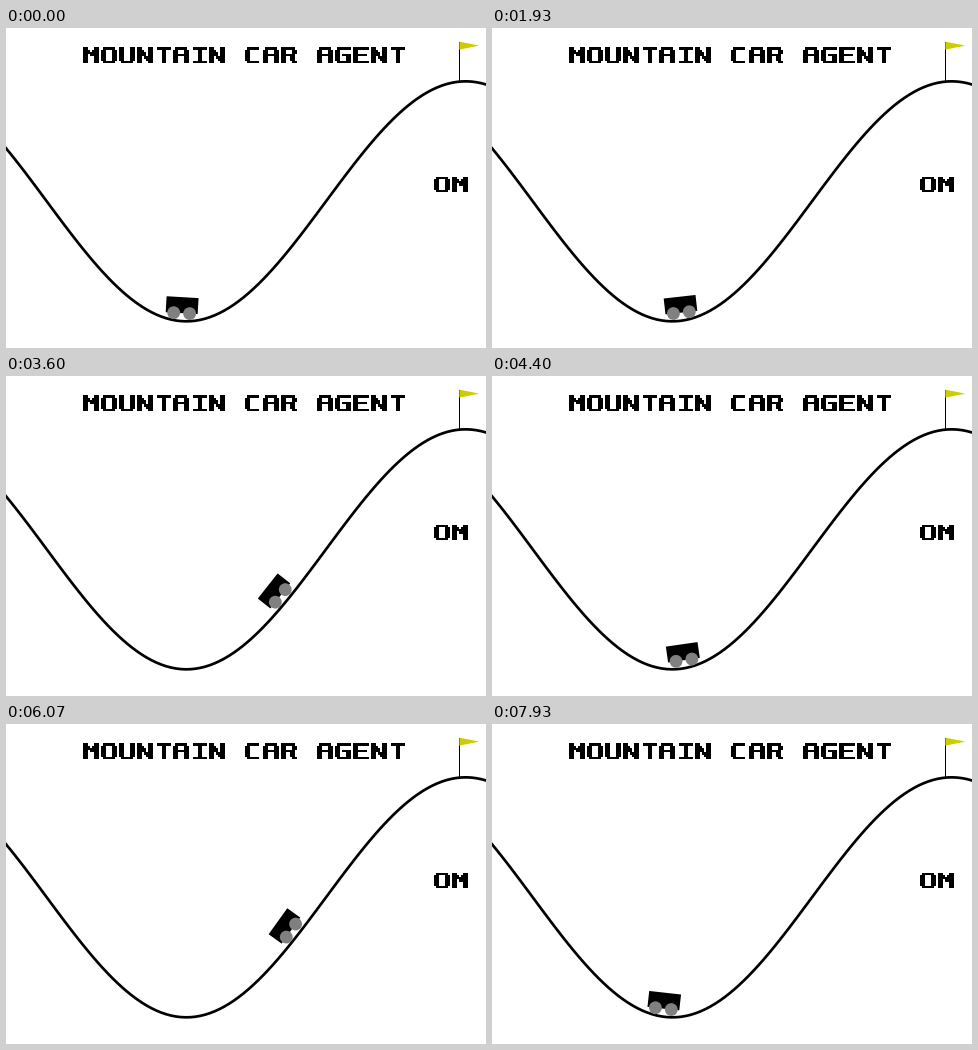
Recreate the animation shown at these times as a matplotlib script. Size 480x320 px, loop 8000 ms.

```python
import numpy as np
import matplotlib.pyplot as plt
from matplotlib.animation import FuncAnimation
from matplotlib.collections import PolyCollection
from matplotlib.patches import Circle, Polygon, Rectangle
from matplotlib.transforms import Affine2D

W, H, DPI = 480, 320, 100
LOOP, POSES, TICKS = 8000, 120, 3   # ms, car poses per loop, ticks per pose
SCALE = W / 1.8                     # the track spans -1.2 .. 0.6
PT = 72 / DPI                       # points per pixel
CELL = 2.25                         # one cell of the 7x7 block letters

# Pen paths over a 3x3 keypad (abc / def / ghi); capitals round that corner.
GLYPHS = {
    "A": "gACi df", "C": "CAGI", "E": "cagi dF", "G": "cAGife",
    "I": "Ac bh Gi", "M": "gaeci", "N": "gaic", "O": "dACIGd",
    "R": "gaCFd ei", "T": "Ac bh", "U": "aGIc",
}

# Where the car turns round: (pose, x), alternately to the right and left.
TURNS = [(0, 175.2), (19.3, 258.3), (37.1, 139), (53.8, 284.7),
         (67.1, 122.5), (89.3, 301), (103.7, 107), (123.4, 317)]


def to_world(px):
    return px / SCALE - 1.2


def ground(px):
    return H - SCALE * (0.45 * np.sin(3 * to_world(px)) + 0.55)


def stalls(k):
    """Poses lost so far: one in four during two slow stretches."""
    return np.clip((k - 43) // 4, 0, 5) + np.clip((k - 94) // 4, 0, 3)


def car_x(k):
    t = k - stalls(k)
    for (t0, x0), (t1, x1) in zip(TURNS, TURNS[1:]):
        if t <= t1:
            ease = (1 - np.cos(np.pi * (t - t0) / (t1 - t0))) / 2
            return x0 + (x1 - x0) * ease


def key_point(key):
    row, col = divmod("abcdefghi".index(key.lower()), 3)
    return np.array([(0, 3, 5)[col], 3 * row])


def glyph_cells(char):
    """Cells inked by a pen two cells wide and one cell high."""
    cells, cut = set(), set()
    for path in GLYPHS.get(char, "").split():
        pts = [key_point(key) for key in path]
        for a, b in zip(pts, pts[1:]):
            for s in np.linspace(0, 1, abs(b - a).max() + 1):
                x, y = np.rint(a + (b - a) * s).astype(int)
                cells |= {(x, y), (x + 1, y)}
        cut |= {(x + (x > 0), y) for key, (x, y) in zip(path, pts)
                if key.isupper()}
    return cells - cut


def block_text(ax, text, left, top):
    quads = []
    for i, char in enumerate(text):
        for cx, cy in glyph_cells(char):
            x0, y0 = left + (8 * i + cx) * CELL, top + cy * CELL
            x1, y1 = x0 + CELL, y0 + CELL
            quads.append([(x0, y0), (x1, y0), (x1, y1), (x0, y1)])
    ax.add_collection(PolyCollection(quads, facecolors="black", linewidths=0,
                                     antialiaseds=False))


fig = plt.figure(figsize=(W / DPI, H / DPI), dpi=DPI, facecolor="white")
ax = fig.add_axes([0, 0, 1, 1])
ax.set_xlim(0, W)
ax.set_ylim(H, 0)
ax.axis("off")

xs = np.linspace(0, W, 100)
ax.plot(xs, ground(xs), color="black", lw=2.7 * PT, zorder=1)

car = [Rectangle((-16, -24), 32, 16, fc="black", lw=0, zorder=2)]
car += [Circle((x, -8), 6.4, fc="0.5", lw=0, zorder=3) for x in (8, -8)]
for part in car:
    ax.add_patch(part)

flag_x = 1.7 * SCALE
base = ground(flag_x)
tip = base - 40
ax.plot([flag_x, flag_x], [base, tip], color="black", lw=PT, zorder=4)
ax.add_patch(Polygon([(flag_x, tip), (flag_x, tip + 8), (flag_x + 20, tip + 4)],
                     fc=(0.8, 0.8, 0), lw=0, zorder=5))

block_text(ax, "MOUNTAIN CAR AGENT", 77, 19.3)
block_text(ax, "OM", 428, 148.7)


def draw(tick):
    x = car_x((tick + 1) // TICKS % POSES)
    tilt = np.cos(3 * to_world(x))
    pose = Affine2D().rotate(-tilt).translate(x, ground(x)) + ax.transData
    for part in car:
        part.set_transform(pose)
    return car


frames = POSES * TICKS
anim = FuncAnimation(fig, draw, frames=frames, interval=LOOP / frames,
                     init_func=lambda: draw(0), repeat=True, repeat_delay=0)
plt.show()
```
